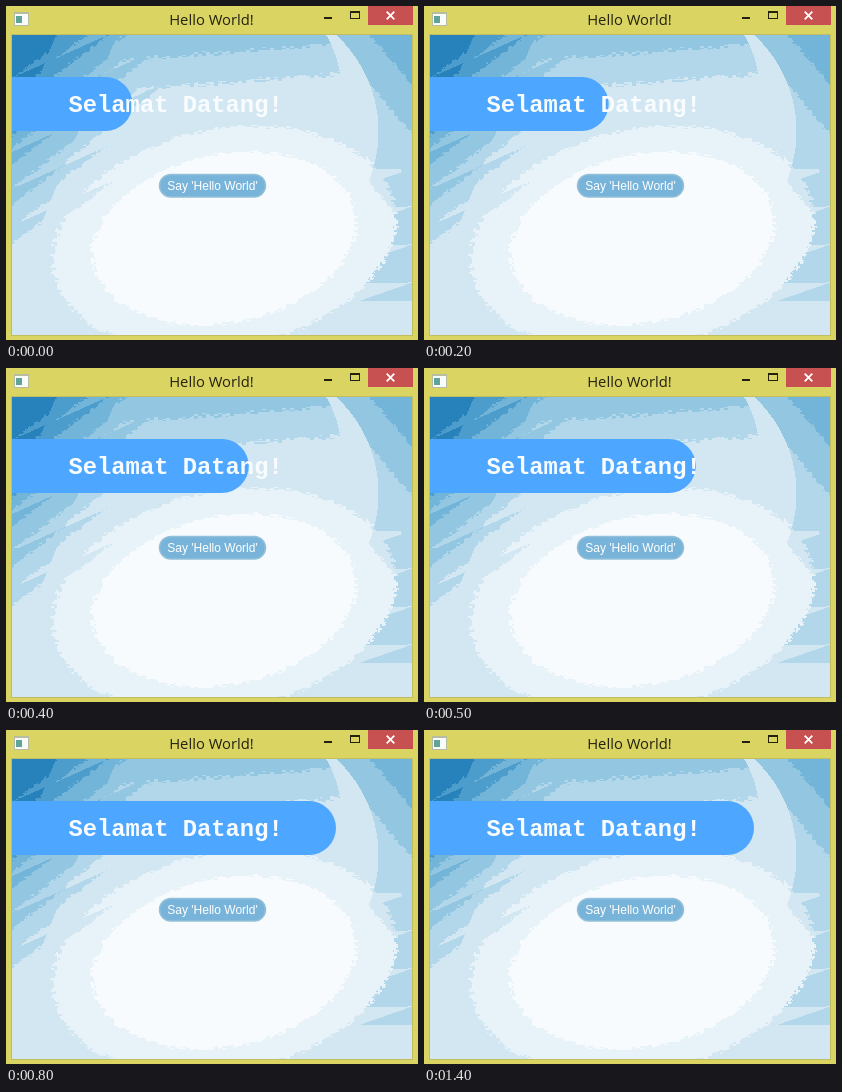
An HTML page with a canvas for the animation above (1.5 s loop, 412 by 334 pixels).

```html
<!DOCTYPE html>
<html lang="en">
<head>
<meta charset="utf-8">
<title>Hello World!</title>
<style>
html, body { margin: 0; width: 100%; height: 100%; overflow: hidden; background: #dad462; }
canvas { display: block; width: 412px; height: 334px; }
</style>
</head>
<body>
<canvas id="stage" width="412" height="334"></canvas>
<script>
const W = 412, H = 334, LOOP = 1500, STEP = 100;
const VIEW = { x: 6, y: 29, w: 400, h: 300 };
const INK = '#24220f', FRAME = '#dad462';
// From the white centre to the deepest corner
const SHADES = ['#f7fbfe', '#e7f2f9', '#d3e7f3', '#b3d7ea', '#93c6e1', '#73b4d9', '#4c9ccc', '#2781ba'];

const ctx = document.getElementById('stage').getContext('2d');
const backdrop = document.createElement('canvas');
backdrop.width = W;
backdrop.height = H;
const bg = backdrop.getContext('2d');

const saw = v => v - Math.floor(v);
const inCircle = (x, y, cx, cy, r) => Math.hypot(x - cx, y - cy) < r;

function rect(g, color, x, y, w, h) {
  g.fillStyle = color;
  g.fillRect(x, y, w, h);
}

function label(g, text, x, y, font, color, align = 'left') {
  g.font = font;
  g.fillStyle = color;
  g.textAlign = align;
  g.fillText(text, x, y);
}

// Noise in small flat blocks, for ragged band edges.
function grain(x, y) {
  const bx = Math.floor(x / 4), by = Math.floor(y / 2);
  return saw(Math.sin(bx * 12.9 + by * 78.2) * 43758.5) - 0.5;
}

// Depth of blue at a point: an oval centre, ramps from the top corners, wedges at the right.
function shadeAt(x, y) {
  const dx = x - VIEW.x, dy = y - VIEW.y, fromRight = VIEW.x + VIEW.w - x;
  const noise = grain(x, y);
  const oval = Math.hypot((x - 218) / 132, (y - 232 + 0.12 * (x - 218)) / 85) + noise * 0.05;
  const centre = oval < 1 ? 0 : oval < 1.3 ? 1 : 2;

  if (x > 230 && !inCircle(x, y, 241, 125, 131)) {
    const spread = y < 295 ? (x - 290) / 116 : 0;
    const wedge = oval > 1.3 && saw((y + 0.35 * x) / 38) < spread ? 3 : 0;
    const corner = 6 - (fromRight + 0.85 * dy) / 42 + noise * 0.1;
    return Math.max(centre, wedge, corner);
  }
  if (x > 230 && !inCircle(x, y, 223, 85, 112)) return centre;

  const shards = 22 * saw((0.45 * x + y) / 37) - 14 * saw((x + 0.4 * y) / 61);
  const corner = 8.6 - (dx + 0.85 * dy + shards) / 32 + noise * 0.2;
  const top = 5.1 - dy / 30 - dx / 400 + noise * 0.2;
  return Math.max(centre, corner, top);
}

function paintArtwork() {
  for (let y = VIEW.y; y < VIEW.y + VIEW.h; y++) {
    for (let x = VIEW.x; x < VIEW.x + VIEW.w; x++) {
      const level = Math.min(SHADES.length - 1, Math.floor(shadeAt(x, y)));
      rect(bg, SHADES[level], x, y, 1, 1);
    }
  }
}

function paintCross(x, y, r) {
  bg.beginPath();
  for (const side of [-r, r]) {
    bg.moveTo(x - side, y - r);
    bg.lineTo(x + side, y + r);
  }
  bg.strokeStyle = '#ffffff';
  bg.lineWidth = 1.8;
  bg.stroke();
}

function paintFrame() {
  rect(bg, FRAME, 0, 0, W, H);
  rect(bg, '#c2bd60', VIEW.x - 1, VIEW.y - 1, VIEW.w + 2, VIEW.h + 2);
  paintArtwork();

  // Window icon
  rect(bg, '#b9bda0', 8, 6, 15, 14);
  rect(bg, '#fafcfa', 9, 8, 13, 11);
  rect(bg, '#5fa39a', 10, 10, 6, 7);

  label(bg, 'Hello World!', 205.5, 19, '14.8px "Open Sans", sans-serif', INK, 'center');

  // Minimise, maximise and close
  rect(bg, INK, 318, 11, 8, 2);
  rect(bg, INK, 344, 5, 10, 8);
  rect(bg, FRAME, 345, 7, 8, 5);
  rect(bg, '#c75050', 362, 0, 45, 19);
  paintCross(384.5, 9.5, 3.8);
}

function paintButton() {
  ctx.beginPath();
  ctx.roundRect(153.5, 168.5, 106, 22.5, 11.25);
  ctx.fillStyle = '#78b4da';
  ctx.fill();
  ctx.strokeStyle = '#93c0d8';
  ctx.lineWidth = 1.5;
  ctx.stroke();
  label(ctx, "Say 'Hello World'", 206.5, 184, '12px "Liberation Sans", Arial, sans-serif', '#ffffff', 'center');
}

// Constant speed, then an even slow-down to rest.
function barEdge(ms) {
  const from = 126.5, to = 330, cruise = 600, brake = 200;
  const speed = (to - from) / (cruise + brake / 2);
  if (ms <= cruise) return from + speed * ms;
  const left = Math.max(0, cruise + brake - ms);
  return to - speed * left * left / (2 * brake);
}

function draw(elapsed) {
  const ms = Math.floor((elapsed % LOOP) / STEP) * STEP;
  ctx.drawImage(backdrop, 0, 0);
  ctx.beginPath();
  ctx.roundRect(VIEW.x, 71, barEdge(ms) - VIEW.x, 54, [0, 27, 27, 0]);
  ctx.fillStyle = '#4da6ff';
  ctx.fill();
  label(ctx, 'Selamat Datang!', 62.5, 106, 'bold 23.8px "Liberation Mono", "Courier New", monospace', '#f8fcff');
  paintButton();
}

paintFrame();
const start = performance.now();
function tick() {
  draw(performance.now() - start);
  requestAnimationFrame(tick);
}
tick();
</script>
</body>
</html>
```
